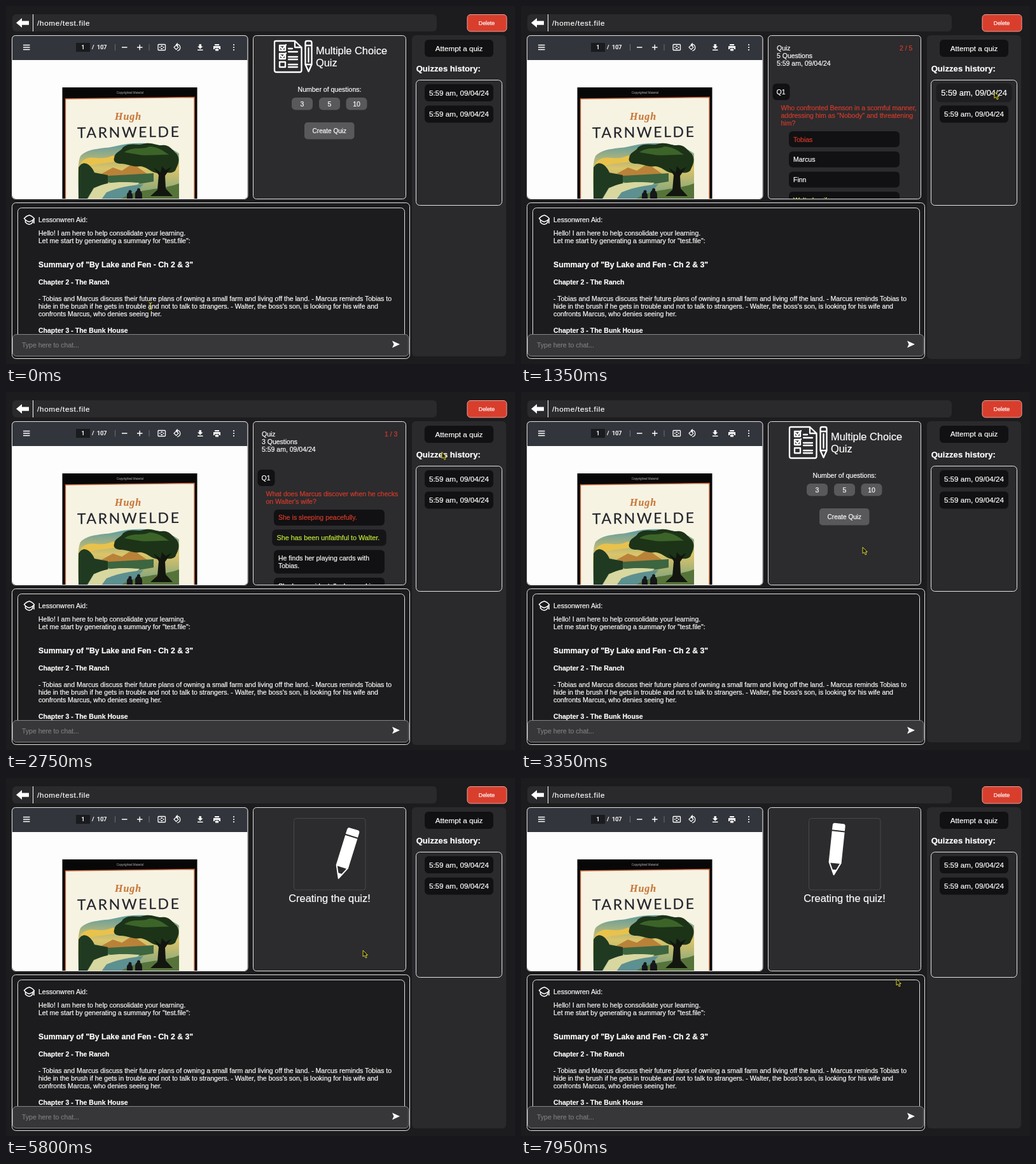
An HTML page for the animation above (8000 ms loop, 800 px wide and 563 px high).

```html
<!DOCTYPE html>
<html lang="en">
<head>
<meta charset="utf-8">
<title>Study quiz</title>
<style>
html, body { margin: 0; width: 100%; height: 100%; overflow: hidden; background: #1c1b1d; }
svg { display: block; width: 100vw; height: 100vh; }
text { font: 10.5px "Liberation Sans", Arial, sans-serif; color: #fff; fill: currentColor; stroke: currentColor; stroke-width: .2px; white-space: pre; }
.mid { text-anchor: middle; }
.bold { font-weight: bold; }
.big { font-size: 16.4px; }
.side { font-size: 11.7px; }
.red { color: #d53c2a; }
.right { color: #c3ee35; }
.faint { color: #7d7c7f; }
.dark rect { fill: #111012; }
.grey rect { fill: #59585b; }
.hover { transform-box: fill-box; transform-origin: center; }
.line { fill: none; stroke: #fff; }
.panel { stroke: #e4e4e4; }
.tool text { font: 500 9px Roboto, sans-serif; }
</style>
</head>
<body>
<svg viewBox="0 0 800 563">
  <defs>
    <clipPath id="viewerClip"><rect x="10" y="47" width="369.5" height="256" rx="5"/></clipPath>
    <clipPath id="quizClip"><rect x="389" y="47" width="239" height="256" rx="5"/></clipPath>
    <clipPath id="chatClip"><rect x="10" y="310" width="624" height="207"/></clipPath>
    <linearGradient id="sky" x2="0" y2="1">
      <stop stop-color="#5d9aa0"/><stop offset=".45" stop-color="#dcc468"/><stop offset="1" stop-color="#6f9f83"/>
    </linearGradient>
  </defs>

  <!-- header -->
  <rect x="10" y="13" width="667" height="27" rx="6" fill="#2a292b"/>
  <path d="M16 26.5 25 19V23.5H36V29.8H25V34Z" fill="#fff"/>
  <path d="M42.5 13V40" class="line"/>
  <text x="49" y="31" style="font-size:11.7px;letter-spacing:.7px">/home/test.file</text>
  <rect x="725" y="13.5" width="62" height="26.5" rx="5" fill="#d93e2d" stroke="#e9a49b"/>
  <text x="755.5" y="30" class="mid" style="font-size:8.8px">Delete</text>

  <!-- document viewer -->
  <g clip-path="url(#viewerClip)">
    <rect x="9" y="46" width="372" height="258" fill="#fdfdfd"/>
    <rect x="9" y="46" width="372" height="39" fill="#32353b"/>
    <g class="tool">
      <rect x="110" y="58" width="22" height="14" fill="#191b1e"/>
      <text x="121" y="68.3" class="mid">1</text><text x="135" y="68.3">/  107</text>
      <path class="line" stroke-width="1.4" d="M27 61.5H37.5M27 65H37.5M27 68.5H37.5M182 65H190.5M206 65H214.5M210.2 60.7V69.3"/>
      <path d="M171.5 60V70M225 60V70" stroke="#6b6e74"/>
      <rect x="239" y="60.5" width="11.5" height="9" rx="1" class="line" stroke-width="1.3"/>
      <path d="M244.8 61.5 246.5 64H243ZM244.8 68.5 246.5 66H243ZM240.5 65 242.5 63.5V66.5ZM249 65 247 63.5V66.5Z" fill="#fff"/>
      <path class="line" stroke-width="1.2" d="M264 65 267.5 61.5 271 65 267.5 68.5ZM268 60.5C275 60 276 69 269 70.5M270 58.5 267.5 60.5 270 62.5"/>
      <path d="M303.5 60H307V63.5H309.5L305.2 67.5 301 63.5H303.5ZM301 68.5H309.5V70H301Z" fill="#fff"/>
      <path d="M328 60H335V62H328ZM326 63H337V68H335V66H328V68H326ZM329 67H334V70.5H329Z" fill="#fff"/>
      <path d="M358 61V61.01M358 65V65.01M358 69V69.01" class="line" stroke-width="2.2" stroke-linecap="round"/>
    </g>
    <!-- cover -->
    <rect x="88.5" y="128" width="212" height="176" fill="#080707"/>
    <text x="195" y="138" class="mid" style="font-size:4.6px;color:#777">Copyrighted Material</text>
    <path d="M93.5 146 296 143.5V304H93.5Z" fill="#f6f3e3" stroke="#c9683c" stroke-width="1.4"/>
    <text x="171" y="179" style="font:italic bold 16px 'Liberation Serif',serif;color:#c97a3c;letter-spacing:1px">Hugh</text>
    <text x="112" y="207.5" transform="rotate(-.6 112 208)" style="font:23px Lato,sans-serif;color:#22232b;letter-spacing:2.6px">TARNWELDE</text>
    <path d="M114 304C113 270 112 247 117 236C130 222 156 225 174 220C206 212 250 215 272 232V304Z" fill="url(#sky)"/>
    <path d="M118 246C132 230 148 246 168 235L180 242C160 250 140 244 120 257Z" fill="#e9c24c"/>
    <path d="M150 264 168 254 182 259 199 248 222 264V273H150Z" fill="#b98238"/>
    <path d="M114 254C122 240 134 250 139 262L160 266V279L138 286 127 304H114Z" fill="#203a22"/>
    <path d="M160 267 232 263V276L190 283 160 277Z" fill="#3d6540"/>
    <path d="M138 287C160 274 188 277 210 278L178 304H128Z" fill="#d8d7a0"/>
    <path d="M158 293C180 284 194 283 216 280L195 304H150Z" fill="#5d9090"/>
    <path d="M180 304C205 286 244 290 272 279V304Z" fill="#56743a"/>
    <path d="M170 239C171 229 181 229 184 222C195 214 207 220 215 217C229 213 236 220 245 219C257 217 262 228 268 232C276 243 268 253 266 259C257 266 249 259 242 263C229 264 223 253 211 252C200 254 191 248 181 248C173 248 168 244 170 239Z" fill="#1c3318"/>
    <path d="M186 230C200 220 213 227 225 221C238 221 248 228 256 234C240 233 221 237 204 233Z" fill="#3c6428"/>
    <path d="M232 254 240 266 238 289 227 299H262L251 287 250 267 260 253 251 258 245 252 243 262Z" fill="#12160f"/>
    <path d="M190 304V298C189 291 199 291 199 298V304ZM203 304V295C204 287 213 288 214 296V304Z" fill="#151719"/>
    <circle cx="195" cy="292" r="2.5" fill="#151719"/><circle cx="208.5" cy="289" r="2.5" fill="#151719"/>
  </g>
  <rect x="9.5" y="46.5" width="370.5" height="257" rx="5" class="line panel"/>

  <!-- quiz panel -->
  <rect x="388.5" y="46.5" width="240" height="257" rx="5" fill="#2c2b2e"/>
  <g clip-path="url(#quizClip)">
    <g id="menu">
      <g class="line" stroke-width="2.3" stroke-linejoin="round" stroke-linecap="round">
        <path d="M424 55H454L464.5 65V101Q464.5 104 462 104H425Q422 104 422 101V57Q422 55 424 55ZM454 55V65H464.5"/>
        <path d="M430 62H439V70H430ZM430 75H439V83H430ZM430 88H439V96H430ZM444 67H450M444 72H458M444 80H458M444 84H458M444 92H458M444 96H458"/>
        <path d="M432 65 434.5 68 440 61M432 78 434.5 81 440 74"/>
        <path d="M470.5 61V58Q470.5 55 473 55H478Q480.5 55 480.5 58V92L475.5 103 470.5 92ZM470.5 62H480.5M470.5 92H480.5M475.5 66V88"/>
      </g>
      <text x="487" y="76" class="big">Multiple Choice</text>
      <text x="487" y="95" class="big">Quiz</text>
      <text x="508.5" y="135" class="mid">Number of questions:</text>
      <g class="grey"><rect x="449" y="144" width="33" height="19.5" rx="6"/><text x="465.5" y="157.5" class="mid">3</text></g>
      <g class="grey hover" id="five"><rect x="492" y="144" width="33" height="19.5" rx="6"/><text x="508.5" y="157.5" class="mid">5</text></g>
      <g class="grey"><rect x="534.5" y="144" width="33" height="19.5" rx="6"/><text x="551" y="157.5" class="mid">10</text></g>
      <g class="grey hover" id="create"><rect x="469" y="183" width="78.5" height="26.5" rx="5"/><text x="508.3" y="199.7" class="mid" style="font-size:10px">Create Quiz</text></g>
    </g>

    <g id="quizFive">
      <text x="402" y="69.5">Quiz</text><text x="402" y="82">5 Questions</text><text x="402" y="94">5:59 am, 09/04/24</text>
      <text x="595" y="69.5" class="red">2 / 5</text>
      <g class="dark"><rect x="395.5" y="122" width="27" height="26" rx="6"/><text x="408.5" y="138.7" class="mid">Q1</text></g>
      <text x="408.5" y="164" class="red">Who confronted Benson in a scornful manner,</text>
      <text x="408.5" y="176" class="red">addressing him as "Nobody" and threatening</text>
      <text x="408.5" y="188" class="red">him?</text>
      <g class="dark">
        <rect x="421" y="197" width="174" height="25" rx="6"/><text x="428" y="213.5" class="red">Tobias</text>
        <rect x="421" y="228.7" width="174" height="25" rx="6"/><text x="428" y="245">Marcus</text>
        <rect x="421" y="260.5" width="174" height="25" rx="6"/><text x="428" y="277">Finn</text>
        <rect x="421" y="292" width="174" height="25" rx="6"/><text x="428" y="308.5" class="right">Walter's wife</text>
      </g>
    </g>

    <g id="quizThree">
      <text x="402" y="69.5">Quiz</text><text x="402" y="82">3 Questions</text><text x="402" y="94">5:59 am, 09/04/24</text>
      <text x="595" y="69.5" class="red">1 / 3</text>
      <g class="dark"><rect x="395.5" y="122" width="27" height="26" rx="6"/><text x="408.5" y="138.7" class="mid">Q1</text></g>
      <text x="408.5" y="164" class="red">What does Marcus discover when he checks</text>
      <text x="408.5" y="176" class="red">on Walter's wife?</text>
      <g class="dark">
        <rect x="421" y="185" width="174" height="25" rx="6"/><text x="428" y="201.3" class="red">She is sleeping peacefully.</text>
        <rect x="421" y="248.5" width="174" height="37" rx="6"/><text x="428" y="265">He finds her playing cards with</text><text x="428" y="277">Tobias.</text>
        <rect x="421" y="292" width="174" height="37" rx="6"/><text x="428" y="308.5">She has accidentally drowned in</text>
        <g class="hover" id="option"><rect x="421" y="216.7" width="174" height="25" rx="6"/><text x="428" y="233" class="right">She has been unfaithful to Walter.</text></g>
      </g>
      <g id="scrollbar"><rect x="617.5" y="47" width="11" height="257" fill="#343336" stroke="#454447"/><rect x="620.5" y="48.5" width="6.5" height="81" rx="3.2" fill="#77767a"/></g>
    </g>

    <g id="loading">
      <rect x="452.5" y="63.5" width="112.5" height="112.5" rx="4" fill="none" stroke="#48474a"/>
      <g id="pencil" fill="#fff">
        <path d="M-10-71V-78Q-10-82-7-82H7Q10-82 10-78V-71ZM-10-69H10V-20H-10Z"/>
        <path d="M-9-20 0-1 9-20Z" fill="#2c2b2e" stroke="#fff" stroke-width="2" stroke-linejoin="round"/>
        <path d="M-4-9H4L0 0Z"/>
      </g>
      <text x="508.5" y="194.5" class="mid big">Creating the quiz!</text>
    </g>
  </g>
  <rect x="388.5" y="46.5" width="240" height="257" rx="5" class="line panel"/>

  <!-- sidebar -->
  <rect id="sidebar" x="638" y="46" width="148" height="505" rx="6" fill="#2a292c"/>
  <g class="dark hover" id="attempt"><rect x="658" y="53" width="108" height="27" rx="6"/><text x="712" y="70.5" class="mid side">Attempt a quiz</text></g>
  <text x="644.7" y="103" class="bold" style="font-size:13.1px">Quizzes history:</text>
  <rect x="644.5" y="116.5" width="135" height="197" rx="6" class="line panel"/>
  <g class="dark hover" id="first"><rect x="658" y="123" width="108" height="27" rx="6"/><text x="712" y="140.7" class="mid side">5:59 am, 09/04/24</text></g>
  <g class="dark hover" id="second"><rect x="658" y="156.5" width="108" height="27" rx="6"/><text x="712" y="174.2" class="mid side">5:59 am, 09/04/24</text></g>

  <!-- chat -->
  <rect x="9.5" y="309.5" width="625" height="245" rx="6" fill="#1c1b1d" stroke="#e4e4e4"/>
  <g clip-path="url(#chatClip)">
    <rect x="18.5" y="317.5" width="608" height="230" rx="6" fill="#1c1b1d" stroke="#e4e4e4"/>
    <path d="M28.5 334Q32 330 36.5 329 41 330 44.5 334.5 41 338.500 36.500 339.500 32 338.500 28.500 334ZM30.500 336.500V340Q33 343 36.500 343.500 40 343 42 340V337M44 335V342" class="line" stroke-width="1.5" stroke-linejoin="round"/>
    <text x="51" y="339.7">Lessonwren Aid:</text>
    <text x="51" y="360.5">Hello! I am here to help consolidate your learning.</text>
    <text x="51" y="372.7">Let me start by generating a summary for "test.file":</text>
    <text x="51" y="411" class="bold" style="font-size:12.25px">Summary of "By Lake and Fen - Ch 2 &amp; 3"</text>
    <text x="51" y="437.5" class="bold">Chapter 2 - The Ranch</text>
    <text x="51" y="464">- Tobias and Marcus discuss their future plans of owning a small farm and living off the land. - Marcus reminds Tobias to</text>
    <text x="51" y="476">hide in the brush if he gets in trouble and not to talk to strangers. - Walter, the boss's son, is looking for his wife and</text>
    <text x="51" y="488">confronts Marcus, who denies seeing her.</text>
    <text x="51" y="514" class="bold">Chapter 3 - The Bunk House</text>
  </g>
  <rect x="10.5" y="516.5" width="622.5" height="34" rx="6" fill="#373639" stroke="#858487"/>
  <text x="25" y="537" class="faint">Type here to chat...</text>
  <path d="M607 526.5 619 532 607 537.5 609.5 532Z" fill="#fff"/>

  <!-- pointer -->
  <g id="cursor" stroke="#d9d32c">
    <path id="arrow" d="M0 0V10L2.5 8 4.2 12 6 11.2 4.5 7.5H7.3Z" fill="#17170f"/>
    <path id="beam" d="M-2.5-5.5Q0-5.5 0-3.5 0-5.5 2.5-5.5M0-4V4M-2.5 5.5Q0 5.5 0 3.5 0 5.5 2.5 5.5" fill="none"/>
  </g>
</svg>
<script>
const LOOP = 8000;
const el = id => document.getElementById(id);
const smooth = p => { p = Math.min(1, Math.max(0, p)); return p * p * (3 - 2 * p); };
const show = (id, on) => { el(id).style.display = on ? "" : "none"; };

// time, x, y of the pointer
const path = [
  [0, 227, 472], [150, 227, 472], [700, 735, 140], [1000, 745, 137], [1350, 744, 135],
  [1600, 716, 168], [1850, 712, 169], [2150, 558, 222], [2500, 565, 220], [2850, 714, 64],
  [3000, 712, 66], [3350, 537, 244], [3800, 541, 222], [4200, 510, 152], [4350, 509, 153],
  [4700, 592, 198], [5150, 592, 198], [5420, 512, 196], [5580, 512, 196], [6000, 603, 335],
  [6200, 605, 333], [6600, 590, 316], [LOOP, 590, 316]
];

function pointerAt(t) {
  const i = path.findIndex(point => point[0] > t);
  const [t0, x0, y0] = path[i - 1], [t1, x1, y1] = path[i];
  const p = smooth((t - t0) / (t1 - t0));
  return [x0 + (x1 - x0) * p, y0 + (y1 - y0) * p];
}

// id, then enter and leave times
const hovers = [
  ["first", 620, 1510], ["second", 1560, 1940], ["attempt", 2720, 3060], ["option", 2070, 2560]
];
const hoverAmount = (t, enter, leave) => smooth((t - enter) / 300) - smooth((t - leave) / 300);

function grow(id, amount) {
  el(id).style.transform = `scale(${1 + amount * .1})`;
}

function draw(t) {
  const inFive = t >= 1000 && t < 1750;
  const inThree = t >= 1750 && t < 2950;
  const inLoading = t >= 5550;
  show("quizFive", inFive);
  show("quizThree", inThree);
  show("loading", inLoading);
  show("menu", !inFive && !inThree && !inLoading);
  show("scrollbar", t < 2600);
  el("sidebar").setAttribute("height", inFive || inThree ? 509 : 505);

  for (const [id, enter, leave] of hovers) {
    const amount = hoverAmount(t, enter, leave);
    grow(id, amount);
    el(id).firstElementChild.style.fillOpacity = 1 - amount * .55;
  }
  grow("five", hoverAmount(t, 4150, 4400));
  grow("create", hoverAmount(t, 4430, 4500) + hoverAmount(t, 5300, 5700));
  el("five").firstElementChild.style.fill = t >= 4330 ? "#111012" : "";

  const stroke = (1 - Math.cos((t - 6750) / 600 * 2 * Math.PI)) / 2;
  el("pencil").setAttribute("transform",
    `translate(${491.5 + 33 * stroke} ${153 + 6 * stroke}) rotate(${6 + 12 * stroke})`);

  const [x, y] = pointerAt(t);
  el("cursor").setAttribute("transform", `translate(${x} ${y})`);
  const overText = t < 400 && y > 345;
  show("beam", overText);
  show("arrow", !overText);
}

const start = performance.now();
function tick(now) {
  draw(Math.max(0, now - start) % LOOP);
  requestAnimationFrame(tick);
}
draw(0);
requestAnimationFrame(tick);
</script>
</body>
</html>
```
